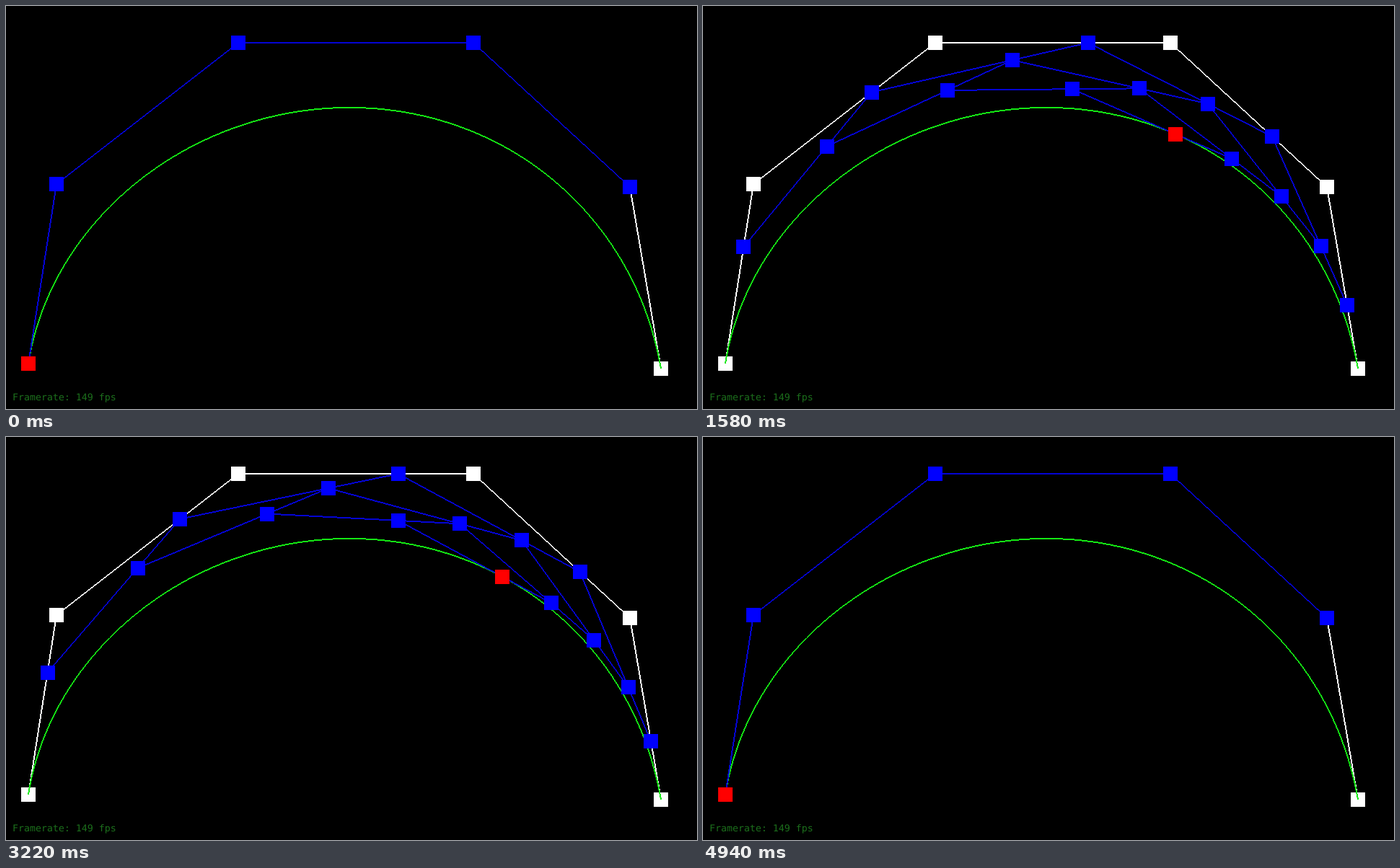
A matplotlib script that plays this animation: 958x559 px, repeating every 4960 ms.

```python
import numpy as np
import matplotlib.pyplot as plt
from matplotlib.animation import FuncAnimation

W, H, DPI = 958, 559, 64
LOOP, TICK = 4960, 20
HALF = 10  # half the side of a square

WHITE, RED, BLUE = (255, 255, 255), (255, 0, 0), (0, 0, 255)
LINE_BLUE, GREEN = (4, 4, 212), (20, 232, 20)

CONTROL = np.array([(31, 496), (70, 247), (322, 51),
                    (648, 51), (865, 251), (908, 503)], float)

# Time in ms and curve parameter: rest, rise, rest, fall, rest
KEY_MS = [0, 460, 1020, 1580, 2210, 2660, 3220, 4100, 4442, LOOP]
KEY_T = [0, 0, 0.34, 0.65, 1, 1, 0.68, 0.19, 0, 0]


def nearest(v):
    return np.floor(np.asarray(v) + 0.5).astype(int)


def levels(t):
    """Point sets of the de Casteljau construction, without the control points."""
    pts, out = CONTROL, []
    while len(pts) > 1:
        pts = pts[:-1] + (pts[1:] - pts[:-1]) * t
        out.append(pts)
    return out


def draw_line(img, a, b, color):
    """Hard-edged line, two pixels thick along its minor axis."""
    steep = abs(b[1] - a[1]) > abs(b[0] - a[0])
    if steep:
        a, b = a[::-1], b[::-1]
    if a[0] > b[0]:
        a, b = b, a
    major = np.arange(nearest(a[0]), nearest(b[0]))
    if not major.size:
        return
    minor = nearest(a[1] + (major + 0.5 - a[0]) * (b[1] - a[1]) / (b[0] - a[0]))
    for m in (minor - 1, minor):
        img[(major, m) if steep else (m, major)] = color


def draw_path(img, pts, color):
    for a, b in zip(pts[:-1], pts[1:]):
        draw_line(img, a, b, color)


def draw_squares(img, pts, color):
    for x, y in nearest(pts):
        img[y - HALF:y + HALF, x - HALF:x + HALF] = color


def parameter(frame):
    # Pictures come in threes: two short ones, then a long one
    block, offset = divmod(frame * TICK, 140)
    t = np.interp(block * 140 + min(offset, 40), KEY_MS, KEY_T)
    return round(t, 2)


backdrop = np.zeros((H, W, 3), np.uint8)
draw_path(backdrop, CONTROL, WHITE)
draw_squares(backdrop, CONTROL, WHITE)
curve = np.array([levels(t)[-1][0] for t in np.linspace(0, 1, 101)])
draw_path(backdrop, curve, GREEN)


def scene(t):
    img = backdrop.copy()
    *inner, tip = levels(t)
    for pts in inner:
        draw_path(img, pts, LINE_BLUE)
    for pts in inner:
        draw_squares(img, pts, BLUE)
    draw_squares(img, tip, RED)
    return img


plt.rcParams["text.hinting"] = "none"
fig = plt.figure(figsize=(W / DPI, H / DPI), dpi=DPI, facecolor="black")
ax = fig.add_axes([0, 0, 1, 1])
ax.axis("off")
stage = ax.imshow(scene(0), extent=(0, W, H, 0), aspect="auto",
                  interpolation="nearest")
ax.text(9, 547, "Framerate: 149 fps", color="#1c701c", family="DejaVu Sans Mono",
        fontsize=13.3 * 72 / DPI, ha="left", va="baseline")


def draw(frame):
    stage.set_data(scene(parameter(frame)))
    return [stage]


anim = FuncAnimation(fig, draw, frames=LOOP // TICK, interval=TICK,
                     repeat=True, repeat_delay=0)
plt.show()
```
